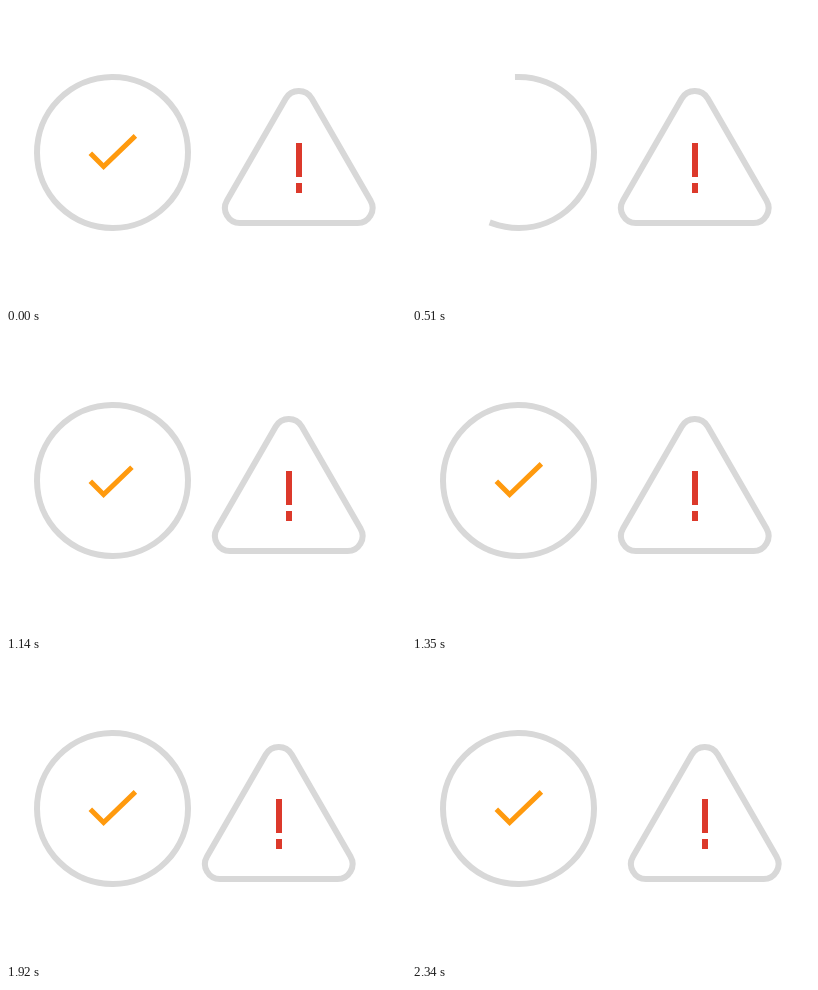
An HTML page that plays this animation: 400x300 px, repeating every 2490 ms.

```html
<!DOCTYPE html>
<html lang="en">
<head>
<meta charset="utf-8">
<title>Status icons</title>
<style>
  html, body { margin: 0; width: 100%; height: 100%; overflow: hidden; background: #fff; }
  svg { display: block; width: 100%; height: 100%; }
  .line { fill: none; stroke: #d8d8d8; stroke-width: 6; stroke-linecap: square; }
  #check { stroke: #ff9a0e; stroke-width: 5; }
</style>
</head>
<body>
<svg viewBox="0 0 400 300">
  <circle id="ring" class="line" cx="106.5" cy="146.5" r="75.5" transform="rotate(-90.4 106.5 146.5)"/>
  <path id="check" class="line" d="M86.1 149.1 L97.6 160.6 L127.6 131.6"/>
  <g id="alert">
    <path class="line" d="M221 194.5 L279.75 92.5 A15 15 0 0 1 305.75 92.5 L364.5 194.5 A15 15 0 0 1 351.5 217 H234 A15 15 0 0 1 221 194.5 Z"/>
    <path fill="#dc392b" d="M290 137 h6 v34 h-6 z M290 177 h6 v10 h-6 z"/>
  </g>
</svg>
<script>
  const LOOP = 2490, STEP = 30;
  const RING = { start: 120, time: 700 };
  const CHECK = { start: 865, time: 300 };
  const SHAKES = [90, 930, 1740];
  const SHAKE_TIME = 600;
  // [progress, x offset] of one damped shake
  const KEYS = [[0, 0], [0.3, -20], [0.5, 20], [0.7, -10], [0.85, 10], [1, 0]];

  const ring = document.getElementById('ring');
  const check = document.getElementById('check');
  const alertIcon = document.getElementById('alert');
  const lengths = new Map([ring, check].map(el => [el, el.getTotalLength()]));

  const clamp = v => Math.min(1, Math.max(0, v));

  function trace(el, { start, time }, t) {
    const part = t < RING.start ? 1 : clamp((t - start) / time);
    const len = lengths.get(el);
    el.style.visibility = part > 0 ? 'visible' : 'hidden';
    el.style.strokeDasharray = part < 1 ? `${part * len} ${len * 2}` : 'none';
  }

  function shakeAt(p) {
    const i = KEYS.findIndex(k => k[0] >= p);
    if (i <= 0) return 0;
    const [p0, x0] = KEYS[i - 1], [p1, x1] = KEYS[i];
    return x0 + (x1 - x0) * (p - p0) / (p1 - p0);
  }

  function draw(ms) {
    const t = Math.floor((ms % LOOP) / STEP + 0.001) * STEP;
    trace(ring, RING, t);
    trace(check, CHECK, t);
    const x = SHAKES.reduce((sum, s) => sum + shakeAt(clamp((t - s) / SHAKE_TIME)), 0);
    alertIcon.setAttribute('transform', `translate(${x.toFixed(2)} 0)`);
  }

  let origin = null;
  function tick(now) {
    if (origin === null) origin = now;
    draw(Math.max(0, now - origin));
    requestAnimationFrame(tick);
  }
  draw(0);
  requestAnimationFrame(tick);
</script>
</body>
</html>
```
